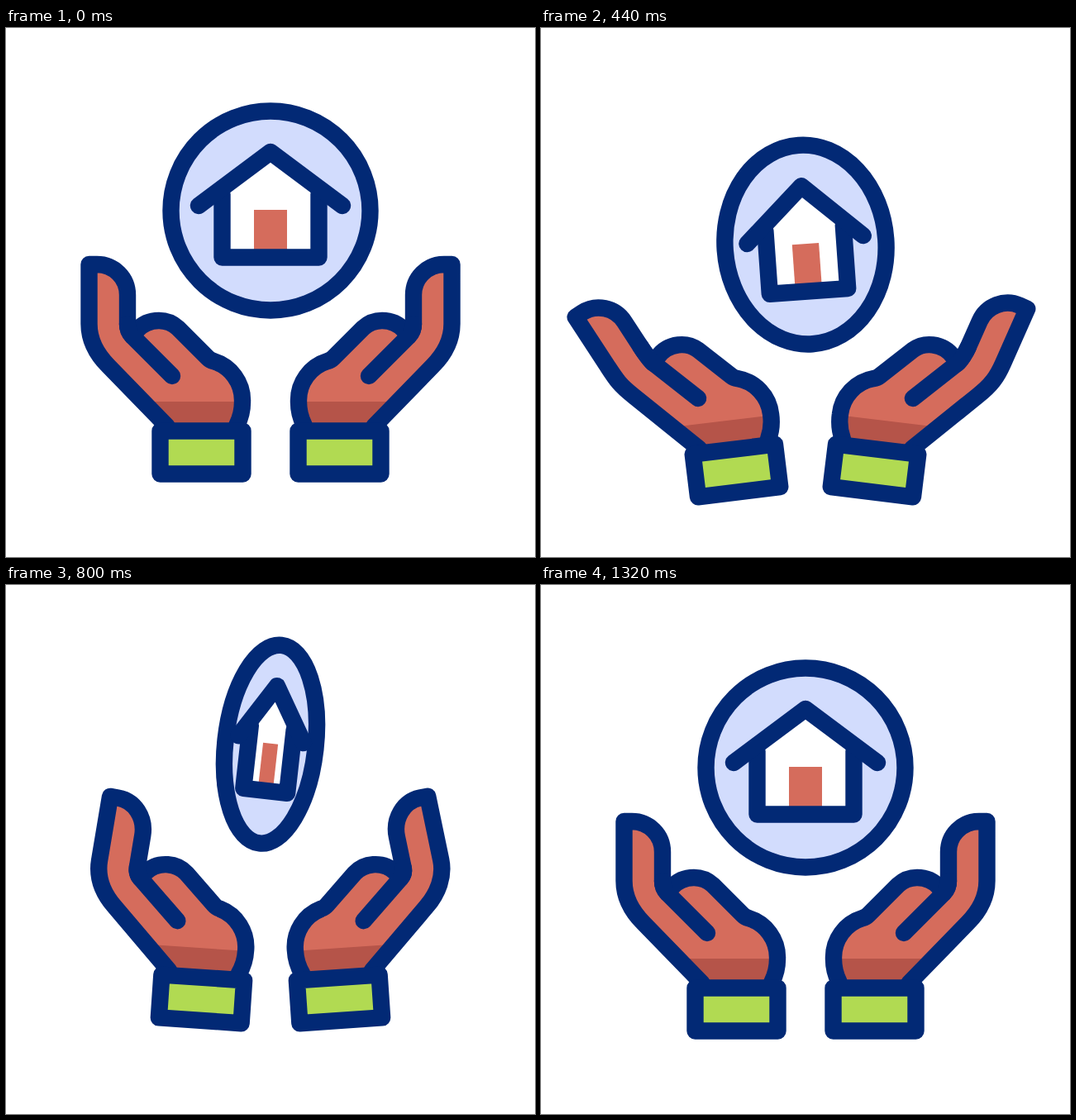
Write an HTML page that moves like this. It is 640 by 640 pixels and loops after 1680 ms.

```html
<!DOCTYPE html>
<html lang="en">
<head>
<meta charset="utf-8">
<title>Caring hands and home</title>
<style>
  html, body { margin: 0; width: 100%; height: 100%; overflow: hidden; background: #fff; }
  svg { display: block; width: 100vw; height: 100vh; }
  .line { stroke: #022975; stroke-width: 20.4; stroke-linecap: round; stroke-linejoin: round; vector-effect: non-scaling-stroke; }
  .none { fill: none; }
  .skin { fill: #d56c5c; }
  .shade { fill: #b55449; }
  .cuff { fill: #b1da52; }
  .sky { fill: #d2dcfd; }
  .wall { fill: #fff; }
</style>
</head>
<body>
<svg viewBox="0 0 640 640">
  <g id="coin">
    <circle class="line sky" r="120.5"/>
    <path class="wall" d="M-58.5 56.5V-27L0 -71L58.5 -27V56.5Z"/>
    <path class="skin" d="M-20 -1H20V50H-20Z"/>
    <path class="line none" d="M-58.5 -20V56.5H58.5V-20"/>
    <path class="line none" d="M-87 -6L0 -71L87 -6"/>
  </g>
  <g id="left"></g>
  <g id="right" transform="translate(640 0) scale(-1 1)"></g>
</svg>
<script>
const LOOP = 1680, STEP = 40;
const PIVOT = [125, 371];

function ease(u) {
  const a = u ** 1.8, b = (1 - u) ** 1.8;
  return a / (a + b);
}

// Keys are [time, value] pairs, eased in and out between neighbours.
function track(keys, t) {
  if (t <= keys[0][0]) return keys[0][1];
  for (let i = 1; i < keys.length; i++) {
    const [a, from] = keys[i - 1], [b, to] = keys[i];
    if (t < b) return from + (to - from) * ease((t - a) / (b - a));
  }
  return keys[keys.length - 1][1];
}

const arm = (low, high) => [[80, 0], [400, low], [760, high], [1080, 0]];
const late = (low, high) => [[160, 0], [480, low], [840, high], [1160, 0]];

const armTurn = arm(-7.2, 4);
const armDrop = arm(22.8, -13);
const coinDrop = late(42.3, -30);
const reach = late(0, 0.09);
const coinTurn = [[80, 0], [320, 7.6], [500, -7.4], [780, 6.6], [1000, -6.7], [1320, 0]];

// One half turn at constant speed, seen from the front.
function coinWidth(t) {
  const u = Math.min(1, Math.max(0, (t - 280) / 800));
  return Math.cos(Math.PI * u);
}

function makeHand(id, bend) {
  const root = document.getElementById(id);
  root.innerHTML = `<g>
    <path class="skin"/>
    <path class="shade" d="M167 452H286A62 62 0 0 1 279.5 480H196Z"/>
    <path class="line none"/>
    <path class="line none"/>
    <rect class="line cuff" x="186.5" y="487.5" width="100" height="52"/>
  </g>`;
  const [fill, , edge, crease] = root.querySelectorAll("path");
  return { body: root.firstElementChild, fill, edge, crease, bend };
}

const hands = [
  makeHand("left", late(-27, 6.4)),
  makeHand("right", late(-17.5, 8.5))
];
const coin = document.getElementById("coin");

function poseHand(hand, t) {
  const a = track(hand.bend, t) * Math.PI / 180;
  const cos = Math.cos(a), sin = Math.sin(a), stretch = 1 + track(reach, t);
  const p = (x, y) => {
    const dx = x - PIVOT[0], dy = (y - PIVOT[1]) * stretch;
    return (PIVOT[0] + dx * cos - dy * sin).toFixed(2) + " " +
           (PIVOT[1] + dx * sin + dy * cos).toFixed(2);
  };
  const knuckle = `${p(147, 358)}C${p(147, 363.5)} 149 369 153 373`;
  const outline = `M195 482L124 409C109 394 ${p(100.5, 377)} ${p(100.5, 358)}` +
    `L${p(100.5, 286)}L${p(110, 286)}` +
    `C${p(130.5, 286)} ${p(147, 302.5)} ${p(147, 323)}L${knuckle}` +
    `L158 366C165 358 175 354 185 354C193.5 354 201.5 357 208 363` +
    `L244 399Q247 402 251 403A49.5 49.5 0 0 1 286 451A62 62 0 0 1 279.5 480`;
  hand.fill.setAttribute("d", outline + "Z");
  hand.edge.setAttribute("d", outline);
  hand.crease.setAttribute("d", `M${knuckle}L201 421`);
  hand.body.setAttribute("transform",
    `translate(0 ${track(armDrop, t)}) rotate(${track(armTurn, t)} 236.5 513.5)`);
}

function draw(t) {
  hands.forEach(hand => poseHand(hand, t));
  coin.setAttribute("transform",
    `translate(320 ${221 + track(coinDrop, t)}) rotate(${track(coinTurn, t)}) scale(${coinWidth(t)} 1)`);
}

let start;
function tick(now) {
  if (start === undefined) start = now;
  const t = Math.max(0, now - start) % LOOP;
  draw(Math.floor((t + 0.01) / STEP) * STEP);
  requestAnimationFrame(tick);
}
draw(0);
requestAnimationFrame(tick);
</script>
</body>
</html>
```
